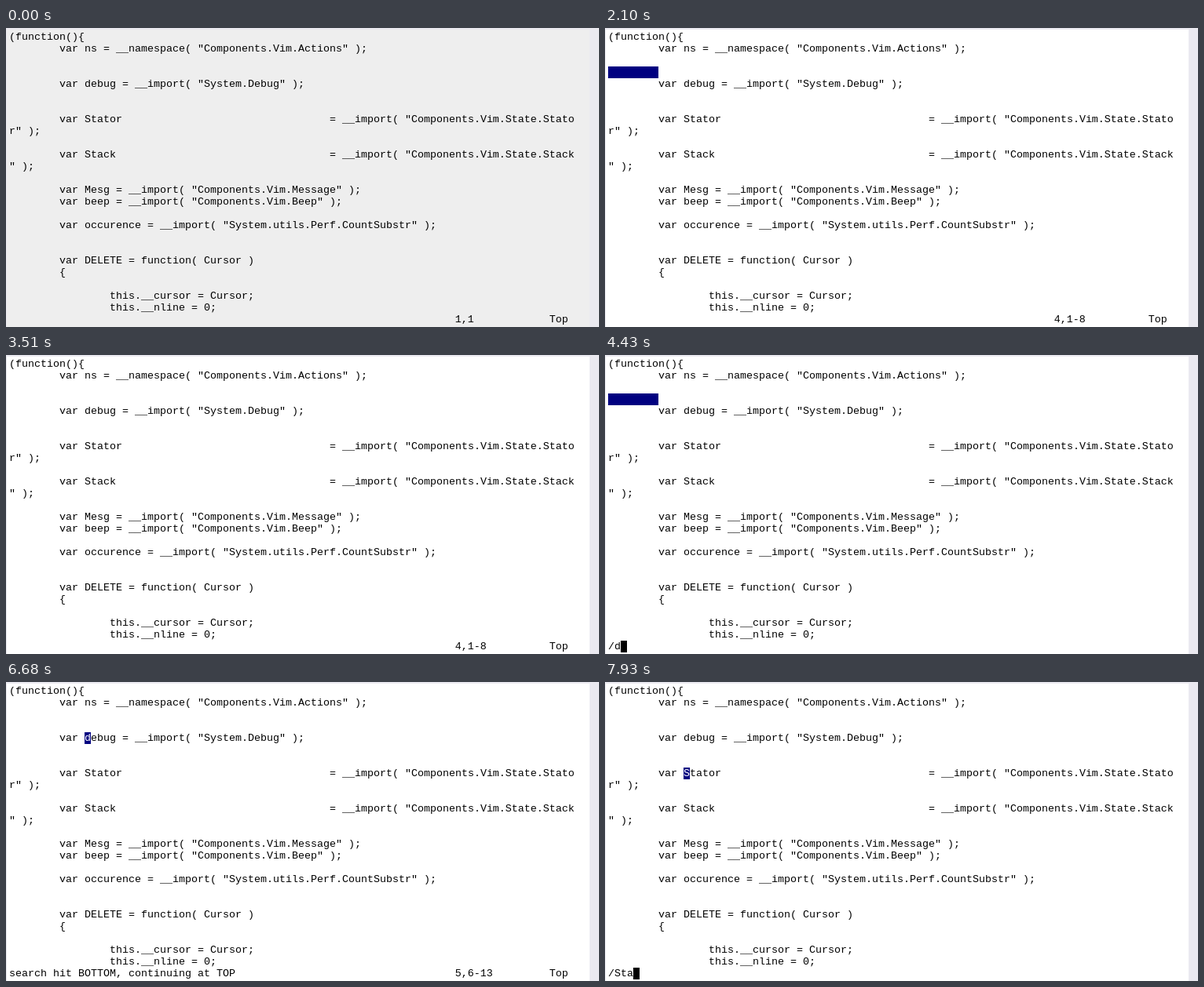
Recreate the animation shown at these times as an HTML page. Size 755 by 381 pixels, loop 8000 ms.

```html
<!DOCTYPE html>
<html lang="en">
<head>
<meta charset="utf-8">
<title>Vim editor</title>
<style>
html, body { margin: 0; width: 100%; height: 100%; overflow: hidden; background: #eae9f0; }
#stage { position: relative; width: 755px; height: 381px; overflow: hidden; }
#page { position: absolute; left: 1px; top: 2px; width: 742px; height: 379px; background: #fff; }
pre {
  position: absolute; left: 4px; top: 4px; margin: 0; color: #000; white-space: pre; tab-size: 8;
  font: 13.3333px/15px "Liberation Mono", "Courier New", monospace;
  font-variant-ligatures: none;
}
#status { top: 364px; }
#cursor { height: 15px; color: #fff; background: #000080; overflow: hidden; }
#prompt { top: 364px; width: 8px; height: 15px; background: #000; }
#pointer { position: absolute; left: 0; top: 0; }
</style>
</head>
<body>
<div id="stage">
  <div id="page"></div>
  <pre id="code"></pre>
  <pre id="status"></pre>
  <pre id="cursor"></pre>
  <pre id="prompt"></pre>
  <svg id="pointer" width="8" height="16" shape-rendering="crispEdges">
    <path d="M0 .5H3M4 .5H7M3.5 1V15M0 15.5H3M4 15.5H7" fill="none" stroke="#000"/>
  </svg>
</div>
<script>
const LOOP = 8000, CELL = 8, LINE = 15, PAD = 4;
const FOCUS = 1330;

const wide = (name, rest) => ("\tvar " + name).padEnd(44) + '= __import( "Components.Vim.State.' + rest;
const rows = [
  '(function(){',
  '\tvar ns = __namespace( "Components.Vim.Actions" );',
  '',
  '\t',
  '\tvar debug = __import( "System.Debug" );',
  '',
  '\t',
  wide('Stator', 'Stato'),
  'r" );',
  '',
  wide('Stack', 'Stack'),
  '" );',
  '',
  '\tvar Mesg = __import( "Components.Vim.Message" );',
  '\tvar beep = __import( "Components.Vim.Beep" );',
  '',
  '\tvar occurence = __import( "System.utils.Perf.CountSubstr" );',
  '',
  '',
  '\tvar DELETE = function( Cursor )',
  '\t{',
  '',
  '\t\tthis.__cursor = Cursor;',
  '\t\tthis.__nline = 0;'
];

const WRAP = 'search hit BOTTOM, continuing at TOP';

// time, cursor row (-1 hides it), cursor column, left text, ruler (empty while typing a search)
const steps = [
  [0, -1, 0, '', '1,1'],
  [1480, 0, 0, '', '1,1'],
  [1790, 1, 0, '', '2,1-8'],
  [1930, 2, 0, '', '3,1'],
  [2100, 3, 0, '', '4,1-8'],
  [2260, 4, 0, '', '5,1-8'],
  [2490, 5, 0, '', '6,1'],
  [2660, 4, 0, '', '5,1-8'],
  [2880, 3, 0, '', '4,1-8'],
  [3510, -1, 0, '', '4,1-8'],
  [3900, 3, 0, '/', ''],
  [4430, 3, 0, '/d', ''],
  [4510, 3, 0, '/de', ''],
  [4600, 3, 0, '/deb', ''],
  [4760, 3, 0, '/debu', ''],
  [4840, 3, 0, '/debug', ''],
  [5070, 4, 12, '/debug', '5,6-13'],
  [5540, 4, 12, WRAP, '5,6-13'],
  [6310, 5, 0, '', '6,1'],
  [6540, 6, 0, '', '7,1-8'],
  [6680, 4, 12, WRAP, '5,6-13'],
  [7000, 5, 0, '', '6,1'],
  [7240, 6, 0, '', '7,1-8'],
  [7390, 7, 12, '', '8,6-13'],
  [7550, 7, 12, '/', ''],
  [7780, 7, 12, '/S', ''],
  [7860, 7, 12, '/St', ''],
  [7930, 7, 12, '/Sta', '']
];

// time, then left and top of the mouse pointer
const moves = [
  [0],
  [FOCUS, 694, 278],
  [1410, 664, 264],
  [1480, 632, 249],
  [1560, 614, 241],
  [1710]
];

const el = id => document.getElementById(id);
const [page, code, status, cursor, prompt, pointer] =
  ['page', 'code', 'status', 'cursor', 'prompt', 'pointer'].map(el);
const show = (node, on) => { node.style.visibility = on ? 'visible' : 'hidden'; };
const at = (table, t) => table.findLast(step => step[0] <= t);

code.textContent = rows.join('\n');

function drawCursor(row, col) {
  show(cursor, row >= 0);
  if (row < 0) return;
  const tab = col === 0 && rows[row][0] === '\t';
  const chars = rows[row].replace(/\t/g, ' '.repeat(8));
  cursor.textContent = tab ? '' : chars[col] || '';
  cursor.style.left = PAD + col * CELL + 'px';
  cursor.style.top = PAD + row * LINE + 'px';
  cursor.style.width = (tab ? 8 : 1) * CELL + 'px';
}

function drawStatus(text, ruler) {
  status.textContent = ruler ? text.padEnd(71) + ruler.padEnd(15) + 'Top' : text;
  show(prompt, !ruler);
  prompt.style.left = PAD + text.length * CELL + 'px';
}

function draw(t) {
  const [, row, col, text, ruler] = at(steps, t);
  page.style.background = t < FOCUS ? '#eee' : '#fff';
  drawCursor(row, col);
  drawStatus(text, ruler);
  const [, x, y] = at(moves, t);
  show(pointer, x !== undefined);
  if (x !== undefined) pointer.style.transform = `translate(${x}px, ${y}px)`;
}

const start = performance.now();
function tick() {
  draw((performance.now() - start) % LOOP);
  requestAnimationFrame(tick);
}
tick();
</script>
</body>
</html>
```
